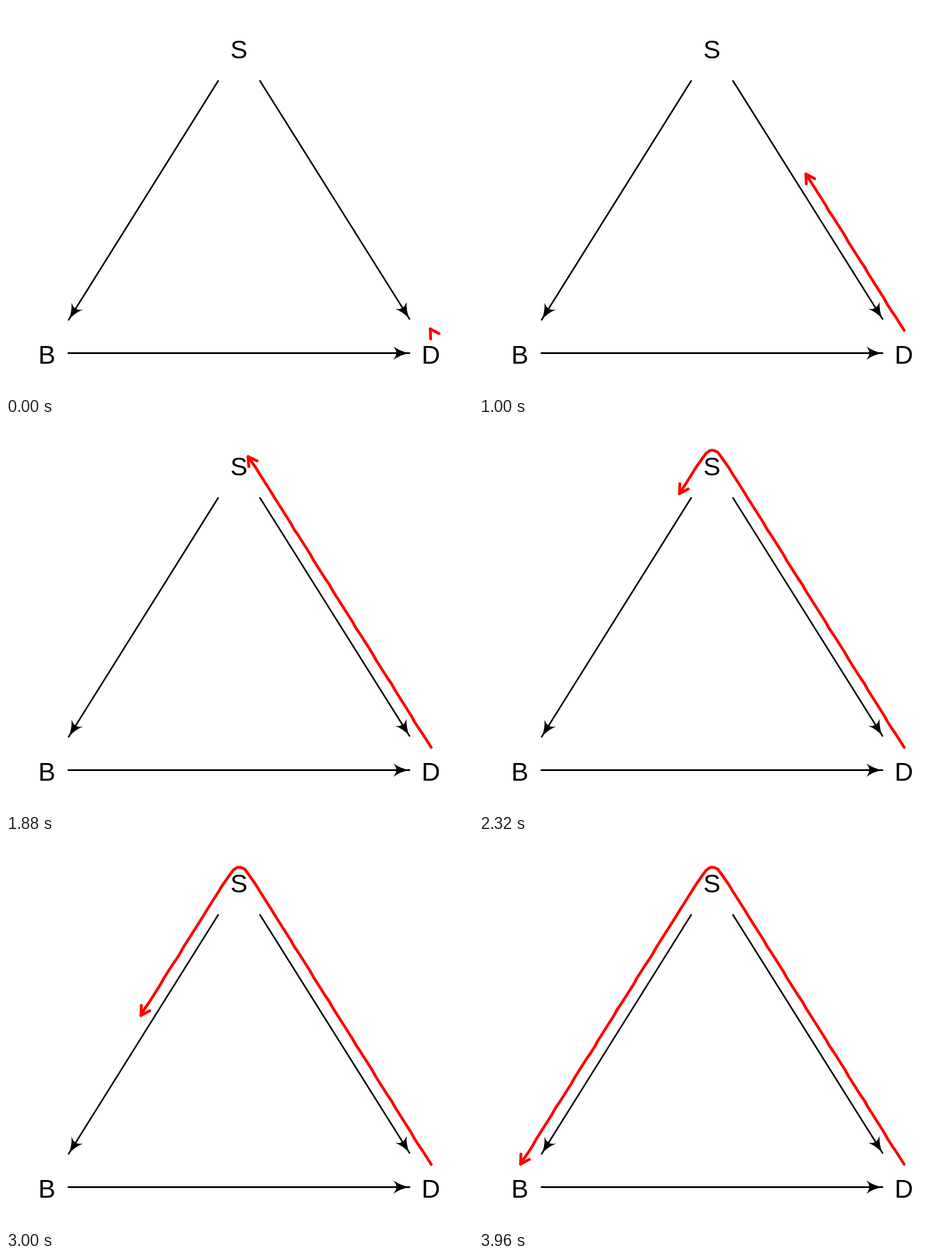
Recreate the animation shown at these times as an HTML page. Size 820 by 683 pixels, loop 4 s.

```html
<!DOCTYPE html>
<html lang="en">
<head>
<meta charset="utf-8">
<title>Path from D through S to B</title>
<style>
  html, body { margin: 0; width: 100%; height: 100%; overflow: hidden; background: #fff; }
  svg { display: block; width: 820px; height: 683px; }
  text { font: 45px "Liberation Sans", Arial, sans-serif; text-anchor: middle; }
  .edge { fill: none; stroke: #000; stroke-width: 2.8; stroke-linecap: round; }
  .trail { fill: none; stroke: #f00; stroke-width: 5; stroke-linecap: round; stroke-linejoin: round; }
</style>
</head>
<body>
<svg viewBox="0 0 820 683">
  <defs>
    <marker id="tip" markerUnits="userSpaceOnUse" markerWidth="32" markerHeight="26"
            viewBox="-30 -13 32 26" refX="0" refY="0" orient="auto">
      <path d="M0 0Q-15 -2.5 -28.5 -11.7Q-18 0 -28.5 11.7Q-15 2.5 0 0Z"/>
    </marker>
  </defs>
  <g class="edge" marker-end="url(#tip)">
    <path marker-end="url(#tip)" d="M372.5 131.5L110 551"/>
    <path marker-end="url(#tip)" d="M446 131.5L708.5 549.5"/>
    <path marker-end="url(#tip)" d="M109.5 609.5H708.5"/>
  </g>
  <text x="409" y="91.5">S</text>
  <text x="71.7" y="627.5">B</text>
  <text x="746" y="627.5">D</text>
  <path id="trail" class="trail"/>
  <path id="head" class="trail"/>
</svg>
<script>
const STEPS = 100, STEP_MS = 40;
const ARM = 17.5, SPREAD = Math.PI / 6;
const trail = document.getElementById("trail");
const head = document.getElementById("head");

// Two straight flanks joined by a rounded peak above S.
function pointAt(step) {
  const u = step - 49.4;
  const x = 409.6 - 6.81 * u + 1.3 * Math.tanh(u / 4);
  const rise = Math.abs(1.597 * (x - 409.6));
  return [x, 32 + Math.cbrt(16 ** 3 + rise ** 3)];
}

const points = Array.from({ length: STEPS }, (_, i) => pointAt(i));
const snapped = [[746.5, 569.5], ...points.map(p => p.map(Math.round))];

function draw(step) {
  const [x, y] = points[step];
  const [px, py] = pointAt(step - 1);
  const back = Math.atan2(py - y, px - x);
  const [tx, ty] = snapped[step + 1];
  const arm = turn =>
    `${tx + ARM * Math.cos(back + turn)} ${ty + ARM * Math.sin(back + turn)}`;
  trail.setAttribute("d", "M" + snapped.slice(0, step + 2).join("L"));
  head.setAttribute("d", `M${arm(-SPREAD)}L${tx} ${ty}L${arm(SPREAD)}`);
}

const start = performance.now();
function tick() {
  const elapsed = performance.now() - start;
  draw(Math.floor(elapsed / STEP_MS) % STEPS);
  requestAnimationFrame(tick);
}
tick();
</script>
</body>
</html>
```
